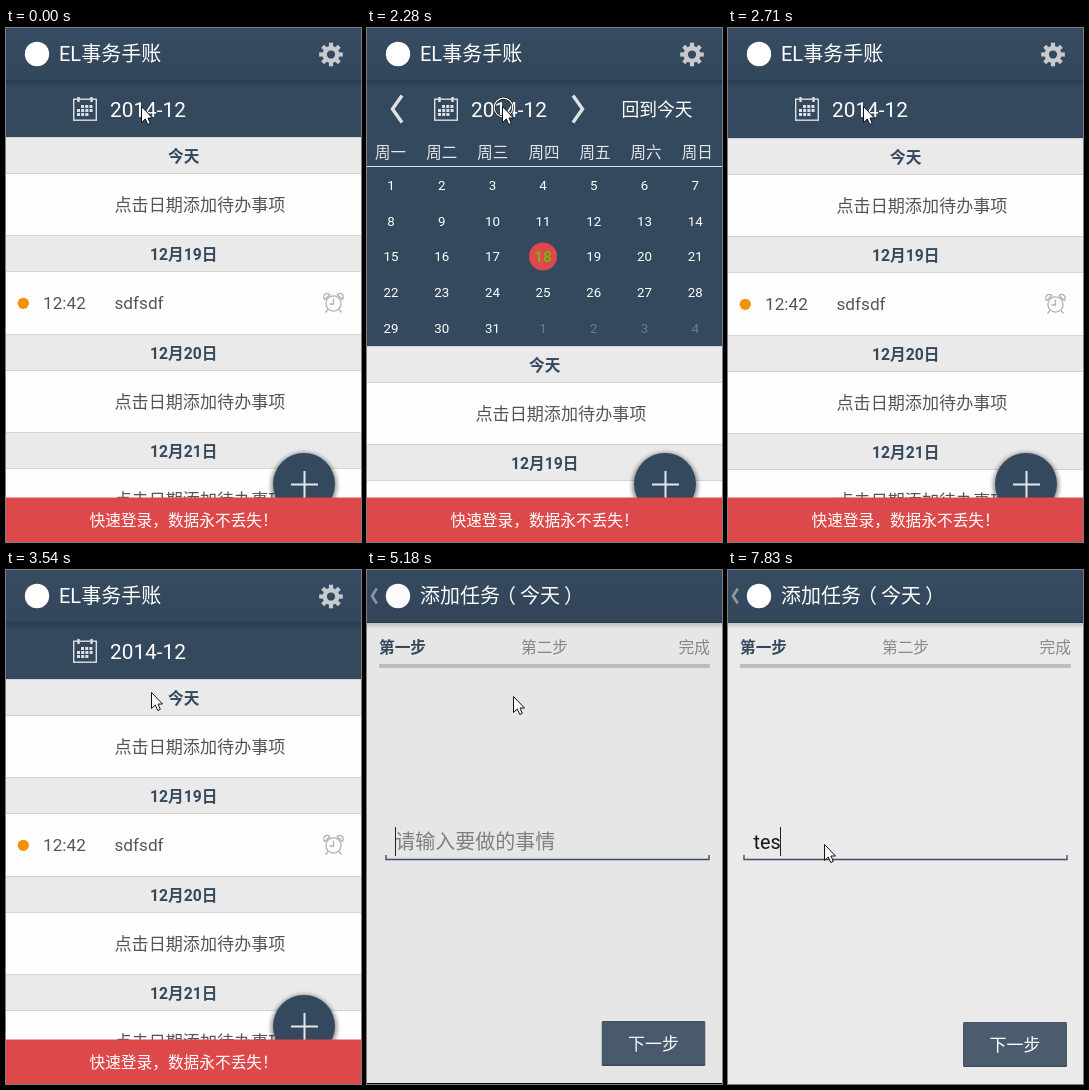
These frames come from a looping animation (355 px wide and 514 px high, 8000 ms). An HTML page:

```html
<!DOCTYPE html>
<html lang="zh-CN">
<head>
<meta charset="utf-8">
<title>日程</title>
<style>
html, body { margin: 0; width: 100%; height: 100%; overflow: hidden; background: #34495e; }
svg { display: block; width: 355px; height: 514px; font-family: Roboto, "Noto Sans CJK SC", "Noto Sans CJK", sans-serif; }
.mid { text-anchor: middle; }
.bold { font-weight: 700; }
.line { fill: none; }
.centred { font-family: "Noto Sans CJK TC", "Noto Sans CJK", sans-serif; }

.anim { animation: 8s step-end infinite; }
#list { animation-name: slide; }
#nav { animation-name: nav; }
#pointer { animation-name: pointer; }
#ring { animation-name: ring; }
#dim { animation-name: dim; }
#page { animation-name: page; transform-origin: 177.5px 257px; }
#field { animation-name: field; }
#next { animation-name: next; }
#hint { animation-name: hint; }
#caret { animation-name: caret; }
#k1 { animation-name: k1; }
#k2 { animation-name: k2; }
#k3 { animation-name: k3; }

@keyframes slide {
  0%, 35.75% { transform: none; }
  1.875% { transform: translateY(166px); }
  3.75% { transform: translateY(208px); }
  5.625% { transform: translateY(209px); }
  30.5% { transform: translateY(165px); }
  32.375% { transform: translateY(42px); }
  33.875% { transform: translateY(1px); }
}
@keyframes nav {
  0%, 33.875% { opacity: 0; }
  1.875%, 30.5% { opacity: .8; }
  3.75% { opacity: 1; }
  32.375% { opacity: .2; }
}
@keyframes pointer {
  0% { transform: translate(135px, 78px); }
  38.875% { transform: translate(135px, 79px); }
  40.75% { transform: translate(138px, 93px); }
  42.375% { transform: translate(143px, 114px); }
  44.25% { transform: translate(145px, 122px); }
  45.875% { transform: translate(146px, 126px); }
  70% { transform: translate(140px, 150px); }
  71.5% { transform: translate(112px, 228px); }
  73% { transform: translate(97px, 265px); }
  74.875% { transform: translate(97px, 272px); }
  90.25% { transform: translate(97px, 273px); }
  94.125%, 100% { transform: translate(96px, 274px); }
}
@keyframes ring {
  0%, 30.5%, 59.75%, 83.25%, 100% { opacity: 0; }
  28.5%, 57.875%, 81.375% { opacity: 1; }
}
@keyframes dim {
  0% { opacity: 0; }
  63.125% { opacity: .4; }
  64.75%, 100% { opacity: 1; }
}
@keyframes page {
  0% { opacity: 0; transform: scale(.95); }
  63.125% { opacity: .6; transform: scale(.95); }
  64.75% { opacity: .985; transform: none; clip-path: inset(0 0 1px 0); }
  66.25%, 100% { opacity: 1; transform: none; clip-path: none; }
}
@keyframes field {
  0% { transform: translateX(3px); }
  66.25%, 100% { transform: none; }
}
@keyframes next {
  0% { transform: translate(-.5px, -1px); }
  66.25%, 100% { transform: none; }
}
@keyframes hint {
  0% { opacity: 1; }
  86.75%, 100% { opacity: 0; }
}
@keyframes caret {
  0%, 74.875% { opacity: 1; transform: none; }
  68.125%, 79.875% { opacity: 0; transform: none; }
  86.75% { opacity: 1; transform: translateX(6px); }
  88.75% { opacity: 1; transform: translateX(17px); }
  96% { opacity: 0; transform: translateX(17px); }
  97.875%, 100% { opacity: 1; transform: translateX(27px); }
}
@keyframes k1 { 0% { fill: transparent; } 86.75%, 100% { fill: #161616; } }
@keyframes k2 { 0% { fill: transparent; } 88.75%, 100% { fill: #161616; } }
@keyframes k3 { 0% { fill: transparent; } 97.875%, 100% { fill: #161616; } }
</style>
</head>
<body>
<svg viewBox="0 0 355 514">
  <defs>
    <linearGradient id="barFill" x2="0" y2="1">
      <stop offset="0" stop-color="#364b61"/>
      <stop offset="1" stop-color="#33475b"/>
    </linearGradient>
    <linearGradient id="shade" x2="0" y2="1">
      <stop offset="0" stop-opacity=".16"/>
      <stop offset="1" stop-opacity="0"/>
    </linearGradient>
    <filter id="soft" x="-20%" y="-20%" width="140%" height="140%"><feGaussianBlur stdDeviation="2.2"/></filter>
    <g id="bar">
      <rect width="355" height="53" fill="url(#barFill)"/>
      <rect y="52" width="355" height="1" fill="#2a3b4d"/>
      <rect y="53" width="355" height="6" fill="url(#shade)"/>
      <circle cx="31" cy="26" r="12.2" fill="#fff"/>
    </g>
  </defs>

  <!-- month view -->
  <rect width="355" height="514" fill="#34495e"/>
  <use href="#bar"/>
  <text x="53" y="33" font-size="20" fill="#fff">EL事务手账</text>
  <g transform="translate(325 26.5)" fill="none" stroke="#c9cacd">
    <circle r="6.3" stroke-width="4.4"/>
    <g id="teeth" stroke-width="4.2"></g>
  </g>
  <g fill="none" stroke="#dce0e4">
    <rect x="67.7" y="71.2" width="22.6" height="21" stroke-width="1.4"/>
    <path d="M72.5 69v5M85.5 69v5" stroke-width="2.4"/>
    <path d="M75 78.5h12M71 82.5h16M71 86.5h12" stroke-width="2.8" stroke-dasharray="3 1.2"/>
  </g>
  <text x="104" y="89.3" font-size="20.8" fill="#fff">2014-12</text>
  <g id="nav" class="anim">
    <path class="line" d="M35 67.5L25.5 81 35 94.5M206 67.5L215.5 81 206 94.5" stroke="#dfe2e5" stroke-width="3.4"/>
    <text x="254.5" y="88.3" font-size="17.8" fill="#fff">回到今天</text>
  </g>
  <g id="month" class="mid" fill="#fff"></g>

  <!-- agenda -->
  <g id="list" class="anim">
    <rect y="109" width="355" height="410" fill="#fefefe"/>
    <g id="days"></g>
    <circle cx="17.3" cy="275.3" r="5.6" fill="#f59000"/>
    <text x="37" y="281.3" font-size="17.2" fill="#555">12:42</text>
    <g fill="none" stroke="#b0b0b0" stroke-width="1.3">
      <circle cx="327.5" cy="275.5" r="7.6"/>
      <path d="M327.5 270.5v5.5h-4M322 281.500l-2.500 3M333 281.500l2.500 3M318.800 271.500a3.500 3.500 0 0 1 5-5zM336.200 271.500a3.500 3.500 0 0 0-5-5z"/>
    </g>
  </g>
  <circle cx="298" cy="457.5" r="33" opacity=".42" filter="url(#soft)"/>
  <circle cx="298" cy="456" r="31" fill="#34495e"/>
  <path d="M285 456.5h27M298.5 443v27" stroke="#e4e7ea" stroke-width="2"/>
  <rect y="469.500" width="355" height="45" fill="#dd494b"/>
  <text x="83.500" y="498.300" font-size="15.700" fill="#fff">快速登录<tspan class="centred">，</tspan>数据永不丢失<tspan class="centred">！</tspan></text>

  <!-- new task -->
  <rect id="dim" class="anim" width="355" height="514"/>
  <g id="page" class="anim">
    <rect width="355" height="514" fill="#eaeaea"/>
    <use href="#bar"/>
    <path class="line" d="M9.800 18.500L5 26l4.800 7.500" stroke="#8f9aa6" stroke-width="2.500"/>
    <text x="53" y="33.300" font-size="20" fill="#fff">添加任务<tspan dx="-4">（</tspan><tspan dx="4">今天</tspan><tspan dx="4">）</tspan></text>
    <g font-size="15.700" fill="#8a8a8a">
      <text class="bold" x="12" y="83.300" fill="#34495e">第一步</text>
      <text x="154" y="83.300">第二步</text>
      <text x="311.500" y="83.300">完成</text>
    </g>
    <rect x="12" y="94" width="331" height="4" fill="#bebebe"/>
    <g id="field" class="anim">
      <path class="line" d="M16 285v4.500h323V285" stroke="#3c5168" stroke-width="1.400"/>
      <text id="hint" class="anim" x="25.300" y="279" font-size="20" fill="#828282">请输入要做的事情</text>
      <text x="25.600" y="279" font-size="19.700"><tspan id="k1" class="anim">t</tspan><tspan id="k2" class="anim">e</tspan><tspan id="k3" class="anim">s</tspan></text>
      <rect id="caret" class="anim" x="25" y="257" width="1" height="29" fill="#222"/>
    </g>
    <g id="next" class="anim">
      <rect x="235" y="452" width="104" height="45" rx="1.500" fill="#3d4e5f"/>
      <rect x="235.500" y="452.500" width="103" height="43" rx="1" fill="#4a5c6d"/>
      <text class="mid" x="287" y="480.500" font-size="17" fill="#fff">下一步</text>
    </g>
  </g>

  <g id="pointer" class="anim">
    <g id="ring" class="anim" fill="none">
      <circle cx="1.500" cy="1.500" r="9.300" stroke="#111" stroke-width="2.400"/>
      <circle cx="1.500" cy="1.500" r="9.300" stroke="#fff" stroke-width="1.200"/>
    </g>
    <path d="M.5 .5V16.500L4.300 13 6.800 18.500 9.300 17.400 7 12H11.500Z" fill="#fff" stroke="#111"/>
  </g>
</svg>
<script>
const add = (id, markup) => document.getElementById(id).insertAdjacentHTML('beforeend', markup);
const text = (x, y, size, str, more = '') => `<text x="${x}" y="${y}" font-size="${size}" ${more}>${str}</text>`;

for (let a = 0; a < 360; a += 45) add('teeth', `<path d="M0-7.500V-11.800" transform="rotate(${a})"/>`);

// weekday names, then five weeks
[...'一二三四五六日'].forEach((d, i) =>
  add('month', text(23.6 + 51.1 * i, 130, 15.5, '周' + d, 'fill="#e3e6e9"')));
add('month', '<rect y="138" width="355" height="1" fill="#dfe2e5"/><circle cx="176" cy="228.5" r="14" fill="#dd494b"/>');
for (let i = 0; i < 35; i++) {
  const x = 24 + 50.7 * (i % 7), y = 161.7 + 35.85 * Math.floor(i / 7), day = i % 31 + 1;
  if (day === 18) add('month', text(x, y + 1, 15.5, day, 'font-weight="500" fill="#6cc00c"'));
  else add('month', text(x, y, 13.3, day, i > 30 ? 'fill="#747b80"' : ''));
}

['今天', '12月19日', '12月20日', '12月21日'].forEach((name, i) => {
  const top = Math.round(109 + 98.3 * i);
  add('days', `<rect y="${top}" width="355" height="37" fill="#d3d3d3"/>
    <rect y="${top + 1}" width="355" height="35" fill="#eaeaea"/>`);
  add('days', text(177.7, top + 24.5, 15.7, name, 'class="mid bold" fill="#34495e"'));
  add('days', i === 1 ? text(108.5, top + 74.3, 17.2, 'sdfsdf', 'fill="#555"')
    : text(108.5, top + 74, 17.1, '点击日期添加待办事项', 'fill="#555"'));
});
</script>
</body>
</html>
```
